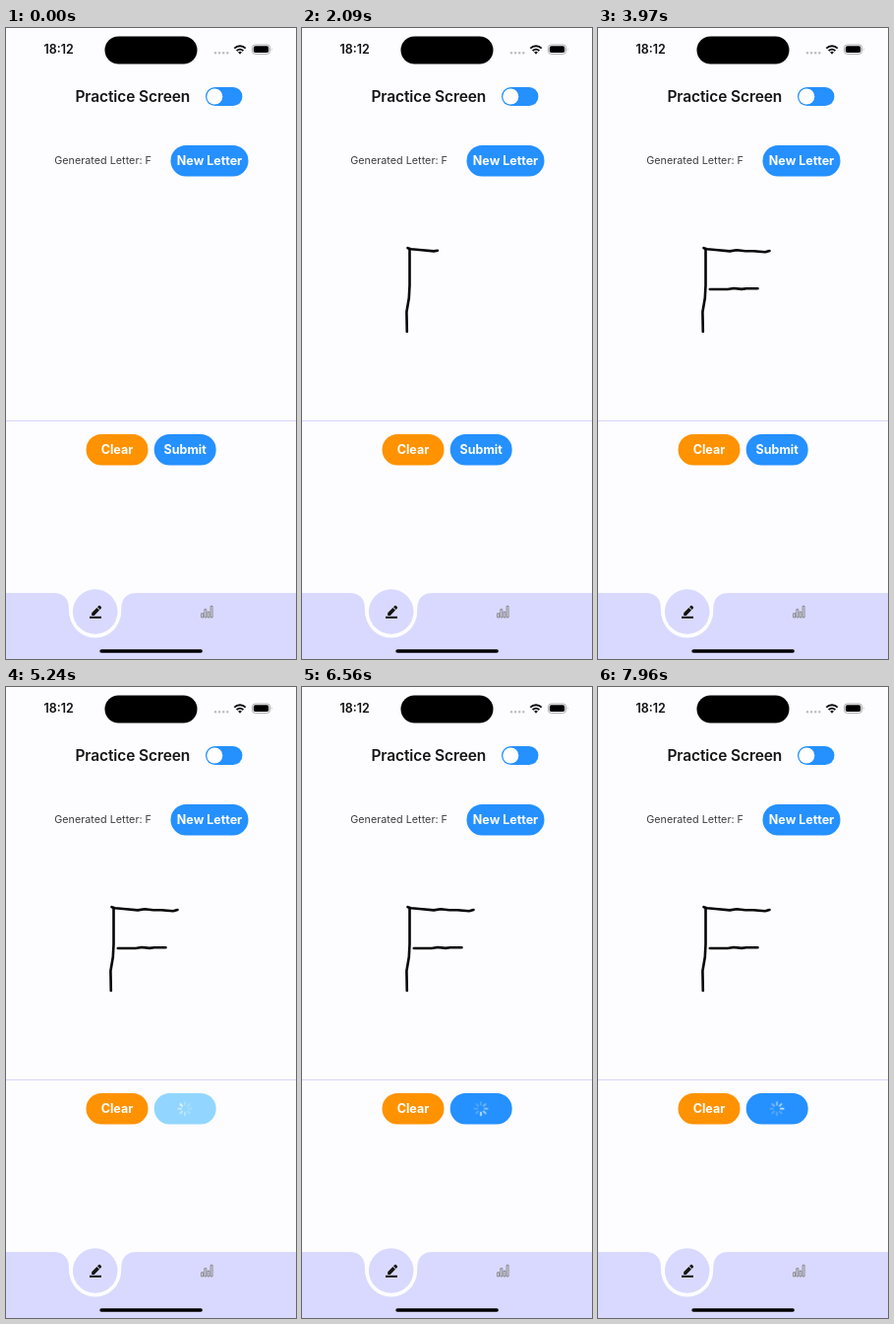
Recreate the animation shown at these times as an HTML page. Size 295 px wide and 640 px high, loop 8 s.

```html
<!DOCTYPE html>
<html lang="en">
<head>
<meta charset="utf-8">
<title>Letter practice</title>
<style>
  html, body { margin: 0; width: 100%; height: 100%; overflow: hidden; background: #fdfdff; }
  svg { display: block; width: 295px; height: 640px; }
  text { font-family: Inter, "Liberation Sans", sans-serif; text-anchor: middle; }
  .title { font-size: 15.5px; font-weight: 600; letter-spacing: -.1px; fill: #151515; }
  .time { font-size: 12.5px; font-weight: 600; fill: #111; }
  .hint { font-size: 10.8px; fill: #3c3c44; }
  .label { font-size: 12.5px; font-weight: 700; fill: #fff; }
  .blue { fill: #2590ff; }
  .orange { fill: #ff9200; }
  .lavender { fill: #d9d9ff; }

  .ink path {
    fill: none; stroke: #050505; stroke-width: 2.6;
    stroke-linecap: round; stroke-linejoin: round;
    stroke-dasharray: 1 2; stroke-dashoffset: 1.06;
    animation: 8s linear infinite;
  }
  .ink .stem { animation-name: stem; }
  .ink .top { animation-name: top; }
  .ink .middle { animation-name: middle; }
  @keyframes stem {
    0%, 6.25% { stroke-dashoffset: 1.06; }
    13.625% { stroke-dashoffset: .18; }
    16.125%, 100% { stroke-dashoffset: 0; }
  }
  @keyframes top {
    0%, 22.5% { stroke-dashoffset: 1.06; }
    30%, 100% { stroke-dashoffset: 0; }
  }
  @keyframes middle {
    0%, 40.6% { stroke-dashoffset: 1.06; }
    49%, 100% { stroke-dashoffset: 0; }
  }

  .submit { animation: press 8s step-end infinite; }
  .submit-label { animation: hide 8s step-end infinite; }
  .loader { opacity: 0; animation: show 8s step-end infinite; }
  .spinner {
    stroke: #fff; stroke-width: 1.7; stroke-linecap: round;
    animation: spin .8s steps(8, end) infinite;
  }
  @keyframes press { 0% { fill: #2590ff; } 64% { fill: #92d6ff; } 66.5%, 100% { fill: #2590ff; } }
  @keyframes hide { 0% { opacity: 1; } 65%, 100% { opacity: 0; } }
  @keyframes show { 0% { opacity: 0; } 65%, 100% { opacity: 1; } }
  @keyframes spin { to { transform: rotate(360deg); } }
</style>
</head>
<body>
<svg viewBox="0 0 295 640">
  <rect width="295" height="640" fill="#fdfdff"/>

  <g id="status">
    <text class="time" x="53.7" y="26.3">18:12</text>
    <rect x="100.5" y="8.5" width="94" height="28" rx="14"/>
    <path d="M213 25.3h13" stroke="#bdbdc2" stroke-width="2.6" stroke-linecap="round" stroke-dasharray="0 4.1" fill="none"/>
    <g fill="none" stroke="#080808" stroke-width="1.9">
      <path d="M232.3 20.6a8.2 8.2 0 0 1 11.4 0M234.6 23.1a4.9 4.9 0 0 1 6.8 0"/>
      <path d="M236.1 24.6a2.7 2.7 0 0 1 3.8 0L238 26.7z" fill="#080808" stroke="none"/>
    </g>
    <rect x="250.5" y="17" width="18" height="9.4" rx="2.9" fill="none" stroke="#a2a2a6" stroke-width=".9"/>
    <rect x="251.8" y="18.3" width="15.4" height="6.8" rx="1.8"/>
    <path d="M269.9 20.3q1.4 1.4 0 2.9z" fill="#a2a2a6"/>
  </g>

  <text class="title" x="128.8" y="75">Practice Screen</text>
  <rect class="blue" x="203" y="60" width="37.5" height="19" rx="9.5"/>
  <circle cx="212.3" cy="69.5" r="8" fill="#fff"/>

  <text class="hint" x="98.6" y="138.3">Generated Letter: F</text>
  <rect class="blue" x="167.5" y="119" width="79" height="31.5" rx="15.75"/>
  <text class="label" x="207" y="139.2">New Letter</text>

  <g class="ink">
    <path class="stem" pathLength="1" d="M109.5 224.5V261L108.8 274L106.4 288L106.8 308"/>
    <path class="top" pathLength="1" d="M107.5 223.2L111 224.2L122 225.2L134 226.4L141 225.3L150 226.2L158 226.2L170 227.2L174.5 226"/>
    <path class="middle" pathLength="1" d="M113.8 265H132L138 264L146 264.9L151 264.2H162.5"/>
  </g>

  <path d="M0 398.5h295" stroke="#d6d6fb"/>

  <rect class="orange" x="81.5" y="412" width="63" height="31.5" rx="15.75"/>
  <text class="label" x="113" y="432.2">Clear</text>
  <rect class="blue submit" x="150.7" y="412" width="63" height="31.5" rx="15.75"/>
  <text class="label submit-label" x="182.2" y="432.2">Submit</text>
  <g class="loader" transform="translate(182 427.7)"><g class="spinner"></g></g>

  <path class="lavender" d="M0 573H48Q64 573 64 590A26.6 27.5 0 0 0 117.2 590Q117.2 573 133 573H295V640H0Z"/>
  <circle cx="90.7" cy="592" r="26.4" fill="#fdfdff"/>
  <circle class="lavender" cx="90.7" cy="592" r="22.8"/>

  <g id="pencil" fill="#15150f">
    <path d="M87.2 595.9v-2.6l5.2-5.3 2.6 2.6-5.2 5.3zM93 587.3l1.3-1.3q.7-.6 1.4 0l1.2 1.2q.6.7 0 1.4l-1.3 1.3z"/>
    <rect x="85" y="596.8" width="12" height="2"/>
  </g>
  <path d="M198.6 593.7h2v4.2h-2zM201.8 589.6h2v8.3h-2zM205 592.2h2v5.7h-2zM208.1 586.3h2v11.6h-2z" fill="#d9d9e4" stroke="#77777c" stroke-width=".8"/>
  <rect x="95.3" y="630.2" width="104.6" height="3.6" rx="1.8"/>
</svg>
<script>
  // The bright spoke starts at 135 degrees; the others fade behind it.
  const spinner = document.querySelector('.spinner');
  for (let i = 0; i < 8; i++) {
    const spoke = document.createElementNS('http://www.w3.org/2000/svg', 'path');
    spoke.setAttribute('d', 'M0 -3.9V-6.6');
    spoke.setAttribute('transform', `rotate(${135 - i * 45})`);
    spoke.setAttribute('opacity', Math.max(.25, .85 - i * .15));
    spinner.append(spoke);
  }
</script>
</body>
</html>
```
